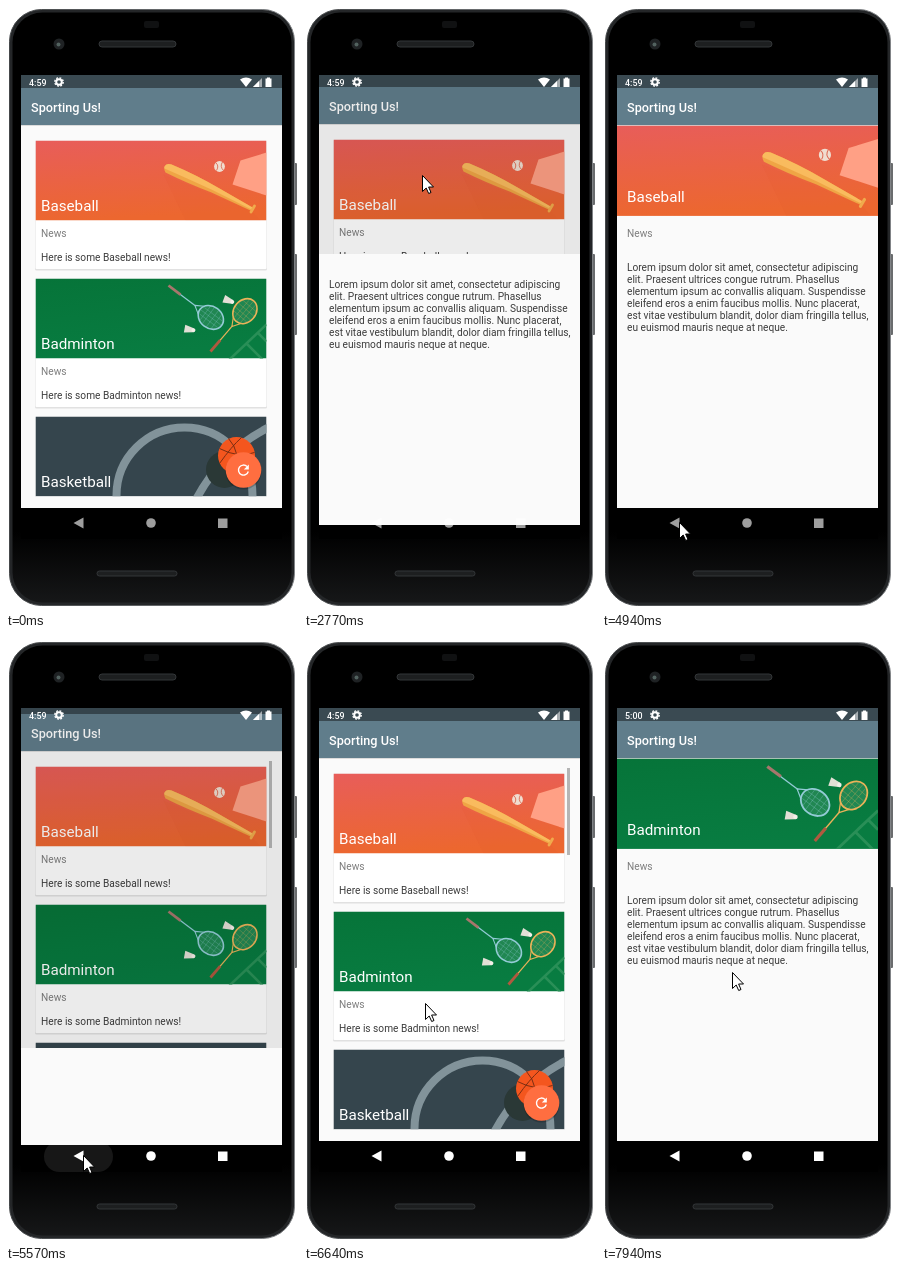
Write an HTML page that moves like this. It is 292x605 px and loops after 8 s.

```html
<!DOCTYPE html>
<html lang="en">
<head>
<meta charset="utf-8">
<title>Sports news app</title>
<style>
  html, body { margin: 0; width: 100%; height: 100%; overflow: hidden; background: #fff; }
  svg { display: block; width: 292px; height: 605px; font: 10.16px Roboto, sans-serif; }
  .title { font-size: 12.7px; font-weight: 500; fill: #fff; }
  .head { font-size: 15.2px; fill: #fff; }
  .sub { fill: #7d7d7d; }
  .body { fill: #3c3c3c; }
  .clock { font-size: 8.9px; font-weight: 500; fill: #fff; }
</style>
</head>
<body>
<svg id="stage" viewBox="0 0 292 605"></svg>
<script>
const LOOP = 8000;
const LOREM = [
  'Lorem ipsum dolor sit amet, consectetur adipiscing',
  'elit. Praesent ultrices congue rutrum. Phasellus',
  'elementum ipsum ac convallis aliquam. Suspendisse',
  'eleifend eros a enim faucibus mollis. Nunc placerat,',
  'est vitae vestibulum blandit, dolor diam fringilla tellus,',
  'eu euismod mauris neque at neque.'
];

const text = (cls, x, y, s) => `<text class="${cls}" x="${x}" y="${y}">${s}</text>`;

const appBar = `
  <rect x="15" y="50" width="261" height="483"/>
  <rect x="15" y="119" width="261" height="383" fill="#fafafa"/>
  <rect x="15" y="119" width="261" height="1" fill="#000" opacity=".12"/>
  <rect x="15" y="55" width="261" height="28" fill="#3a4a52"/>
  <rect x="15" y="82" width="261" height="37" fill="#607d8b"/>
  ${text('title', 25, 106, 'Sporting Us!')}`;

const card = (name, i) => `
  <g transform="translate(29.5 ${134.5 + 138 * i})">
    <rect x="-.5" width="232" height="130" rx="1.5" fill="#000" opacity=".1"/>
    <rect width="231" height="128.5" rx="1" fill="#fff"/>
    <use href="#${name}"/>
    ${text('head', 5.5, 70.5, name)}
    ${text('sub', 5.5, 96, 'News')}
    ${text('body', 5.5, 120, `Here is some ${name} news!`)}
  </g>`;

const racket = (x, y, angle, color, grip) => `
  <g transform="translate(${x} ${y}) rotate(${angle})" fill="none" stroke="${color}">
    <ellipse cx="53" rx="13.500" ry="11" fill="#fff" fill-opacity=".1" stroke-width="1.6"/>
    <path d="M42-4H64M40 0H66M42 4H64M46-9V9M50-10V10M55-10V10M60-9V9" stroke-width=".5" opacity=".5"/>
    <path d="M33 0L41-5M33 0L41 5" stroke-width="1.1"/>
    <path d="M14 0H34" stroke-width="1.2"/>
    <path d="M0 0H15" stroke="${grip}" stroke-width="2.800"/>
  </g>`;

const shuttle = (x, y, angle) => `
  <g transform="translate(${x} ${y}) rotate(${angle})">
    <path d="M-5-4L4-2V2L-5 4Z" fill="#e3dfd6"/><circle cx="4" r="2" fill="#f3efe8"/>
  </g>`;

const art = `
  <g id="Baseball" clip-path="url(#frame)">
    <rect width="231" height="80" fill="url(#warm)"/>
    <path d="M128 34L150 80H225L217 71Z" fill="#d9552c" opacity=".12"/>
    <path d="M231 12L205 20L197 44L231 55Z" fill="#ffa085"/>
    <path d="M131 24Q127 27 130 32Q150 42 176 52L215 70L217 67L184 48Q160 34 136 24Q133 23 131 24Z" fill="#efa545"/>
    <path d="M131 24Q128 26 129 28Q152 38 178 50L216 69L217 67L184 48Q160 34 136 24Q133 23 131 24Z" fill="#f9bb5e"/>
    <path d="M215.500 71.500L219 65.500" stroke="#f0aa4c" stroke-width="2.800" stroke-linecap="round"/>
    <circle cx="184" cy="26" r="5.400" fill="#f0ddd0"/>
    <path d="M180 22Q184 25 181 30M187 21.500Q184 26 188 30" fill="none" stroke="#dd6a52" stroke-width=".9"/>
  </g>
  <g id="Badminton" clip-path="url(#frame)">
    <rect width="231" height="80" fill="url(#green)"/>
    <path d="M194 81L231 46M211 65L227 81M222 54L231 63" fill="none" stroke="#298f57" stroke-width="2.500"/>
    ${racket(133, 7, 37, '#93cbd6', '#a8766c')}
    ${racket(175, 73, -49.5, '#eab259', '#b0593f')}
    ${shuttle(154, 51, 10)}
    ${shuttle(193, 22, 20)}
  </g>
  <g id="Basketball" clip-path="url(#frame)">
    <rect width="231" height="80" fill="#35454d"/>
    <g fill="none" stroke="#82939a" stroke-width="8">
      <circle cx="149" cy="79" r="68"/>
      <path d="M235 10Q186 34 160 84"/>
    </g>
    <circle cx="189" cy="53" r="18.500" fill="#2a3836"/>
    <circle cx="201" cy="39" r="18.500" fill="#f4561e"/>
    <path d="M184 32Q203 42 219 36M193 22Q206 36 200 58M206 21Q196 30 184 47" fill="none" stroke="#6e2a12" stroke-width=".9"/>
  </g>`;

document.getElementById('stage').innerHTML = `
  <defs>
    <linearGradient id="warm" x2=".15" y2="1"><stop stop-color="#e85d5a"/><stop offset="1" stop-color="#ec672f"/></linearGradient>
    <linearGradient id="green" x2=".3" y2="1"><stop stop-color="#067439"/><stop offset="1" stop-color="#087c41"/></linearGradient>
    <linearGradient id="rim"><stop stop-color="#45484a"/><stop offset="1" stop-color="#808386"/></linearGradient>
    <linearGradient id="bezel" x2="0" y2="1"><stop offset=".88"/><stop offset="1" stop-color="#161718"/></linearGradient>
    <clipPath id="frame"><rect width="231" height="80"/></clipPath>
    <clipPath id="screen"><rect x="15" y="69" width="261" height="464"/></clipPath>
    <clipPath id="reveal"><rect id="revealBox" x="15" width="261" height="464"/></clipPath>
    ${art}
  </defs>
  <rect x="286" y="157" width="5" height="42" rx="1" fill="#6a6c6e"/>
  <rect x="286" y="248" width="5" height="81" rx="1" fill="#6a6c6e"/>
  <rect x="3.500" y="3.500" width="285" height="596" rx="32" fill="#242628" stroke="url(#rim)"/>
  <rect x="6.500" y="6.500" width="279" height="590" rx="30" fill="url(#bezel)"/>
  <rect x="138" y="15" width="15" height="7" rx="2" fill="#101112"/>
  <circle cx="53" cy="38" r="5.500" fill="#1f2224"/><circle cx="52.500" cy="38.500" r="2" fill="#52625f"/>
  <rect x="93" y="35" width="77" height="6" rx="3" fill="#1d1f20" stroke="#333638"/>
  <rect x="91" y="565" width="80" height="5" rx="2.500" fill="#1d1f20" stroke="#333638"/>

  <g clip-path="url(#screen)">
    <rect x="15" y="69" width="261" height="464"/>
    <g id="list">
      ${appBar}
      <svg x="15" y="120" width="261" height="370.500" style="width:261px;height:370.5px" viewBox="15 120 261 370.500">
        ${['Baseball', 'Badminton', 'Basketball'].map(card).join('')}
      </svg>
      <rect id="scrollbar" x="263" y="129" width="3" height="87" fill="#000" fill-opacity=".28"/>
      <circle cx="237.500" cy="465.500" r="18" fill="#000" opacity=".2"/>
      <circle cx="237.500" cy="464" r="17.800" fill="#ff6e40"/>
      <path d="M241 460.500A5 5 0 1 0 242.300 465.500" fill="none" stroke="#fff" stroke-width="1.400"/>
      <path d="M242.800 458.500V463.500H237.800Z" fill="#fff"/>
      <rect id="dim" x="15" y="50" width="261" height="483"/>
    </g>
    <g id="detail" clip-path="url(#reveal)">
      ${appBar}
      <use id="banner" transform="translate(15 119.500) scale(1.13)"/>
      <text id="heading" class="head" x="25" y="196"></text>
      ${text('sub', 25, 231, 'News')}
      ${LOREM.map((line, i) => text('body', 25, 265 + 12 * i, line)).join('')}
    </g>
    <text id="clock" class="clock" x="23" y="79.500"></text>
    <circle cx="53" cy="76" r="2.800" fill="none" stroke="#fff" stroke-width="2"/>
    <circle cx="53" cy="76" r="4.200" fill="none" stroke="#fff" stroke-width="1.400" stroke-dasharray="1.8 1.5"/>
    <path d="M234 73.500Q240 69.500 246 73.500L240 81Z" fill="#fff"/>
    <path d="M247 81L256 72V81Z" fill="#fff" opacity=".55"/><path d="M247 81L253 75V81Z" fill="#fff"/>
    <path d="M259.500 72.500H261V71.500H264V72.500H265.500V81H259.500Z" fill="#fff"/>
    <rect id="pill" y="502" height="31" rx="15.500" fill="#fff"/>
    <g id="nav" fill="#fff">
      <path d="M67.500 517L77.500 511.500V522.500Z"/><circle cx="145" cy="517" r="4.800"/><rect x="212" y="512.500" width="9.500" height="9.500"/>
    </g>
  </g>
  <g id="cursor">
    <g id="ring" fill="none"><circle r="11" stroke="#000"/><circle r="10" stroke="#fff"/></g>
    <path d="M.5 .5V16.500L4.200 13L6.700 18.500L9 17.500L6.600 12H11.500Z" fill="#fff" stroke="#000"/>
  </g>`;

const $ = Object.fromEntries([...document.querySelectorAll('[id]')].map(e => [e.id, e]));
const clamp = v => Math.min(1, Math.max(0, v));
const smooth = p => p * p * (3 - 2 * p);
const between = (t, a, b) => t >= a && t < b;
const move = (x, y) => `translate(${Math.round(x)} ${Math.round(y)})`;

function bezier(x, x1, y1, x2, y2) {
  const at = (u, a, b) => 3 * (1 - u) * (1 - u) * u * a + 3 * (1 - u) * u * u * b + u * u * u;
  let lo = 0, hi = 1;
  for (let i = 0; i < 24; i++) {
    const mid = (lo + hi) / 2;
    if (at(mid, x1, x2) < x) lo = mid; else hi = mid;
  }
  return at(lo, y1, y2);
}
const standard = p => bezier(p, .4, 0, .2, 1);
const emphasized = p => p < 1 / 6
  ? .4 * bezier(p * 6, .3, 0, .8, .15)
  : .4 + .6 * bezier((p - 1 / 6) * 1.2, .05, .7, .1, 1);

const STEP = 76.4;
const BURSTS = [0, 840, 910, 1070, 2390, 2540, 2770, 3470, 4620, 4940, 5110, 6100, 7020, 7480];
function sample(t) {
  const start = BURSTS.filter(b => b <= t).pop();
  return start + Math.floor((t - start) / STEP) * STEP;
}

// Pointer moves: begin, end, x, y.
const MOVES = [
  [840, 840, 287, 575], [910, 910, 293, 467], [1000, 1830, 118, 169],
  [3470, 3470, 105, 209], [3470, 4080, 64, 518], [4620, 4620, 67, 518],
  [4940, 4940, 77, 516], [6000, 6860, 130, 333]
];
function pointer(t) {
  let x = 400, y = 600;
  for (const [begin, end, toX, toY] of MOVES) {
    if (t < begin) break;
    const p = end > begin ? smooth(clamp((t - begin) / (end - begin))) : 1;
    x += (toX - x) * p;
    y += (toY - y) * p;
  }
  return move(x, y);
}

const OPEN = 2683.5, CLOSE = 5472, REOPEN = 7455, DURATION = 425;

function render(t) {
  const closing = between(t, CLOSE, REOPEN);
  const since = t - (t < CLOSE ? OPEN : closing ? CLOSE : REOPEN);
  const p = clamp(since / DURATION);
  const slide = closing ? 1 - standard(p) : standard(p);
  const shown = closing ? 1 - emphasized(p) : emphasized(p);

  $.list.setAttribute('transform', move(0, -9 * slide));
  $.dim.setAttribute('opacity', .1 * (closing ? 1 - p : clamp(since / 117)));
  $.detail.setAttribute('transform', move(0, 19.5 * (1 - slide)));
  $.detail.setAttribute('visibility', shown > .001 ? 'visible' : 'hidden');
  $.revealBox.setAttribute('y', Math.round(69 + 464 * (1 - shown)));

  const sport = t < REOPEN ? 'Baseball' : 'Badminton';
  $.banner.setAttribute('href', '#' + sport);
  $.heading.textContent = sport;
  $.clock.textContent = t < 7930 ? '4:59' : '5:00';

  $.scrollbar.setAttribute('opacity', t < CLOSE ? 0 : clamp(1 - (t - 6960) / 280));
  $.nav.setAttribute('opacity', t < 5110 ? .62 : 1);

  const width = 69 * (.5 + .5 * clamp((t - 5110) / 230));
  $.pill.setAttribute('x', 72.5 - width / 2);
  $.pill.setAttribute('width', width);
  $.pill.setAttribute('opacity', t < 5110 ? 0 : .09 * clamp((5870 - t) / 280));

  $.cursor.setAttribute('transform', pointer(t));
  const pressed = between(t, 2390, 2540) || between(t, 5110, 5260) || between(t, 7090, 7240);
  $.ring.setAttribute('visibility', pressed ? 'visible' : 'hidden');
}

function tick() {
  render(sample(performance.now() % LOOP));
  requestAnimationFrame(tick);
}
tick();
</script>
</body>
</html>
```
